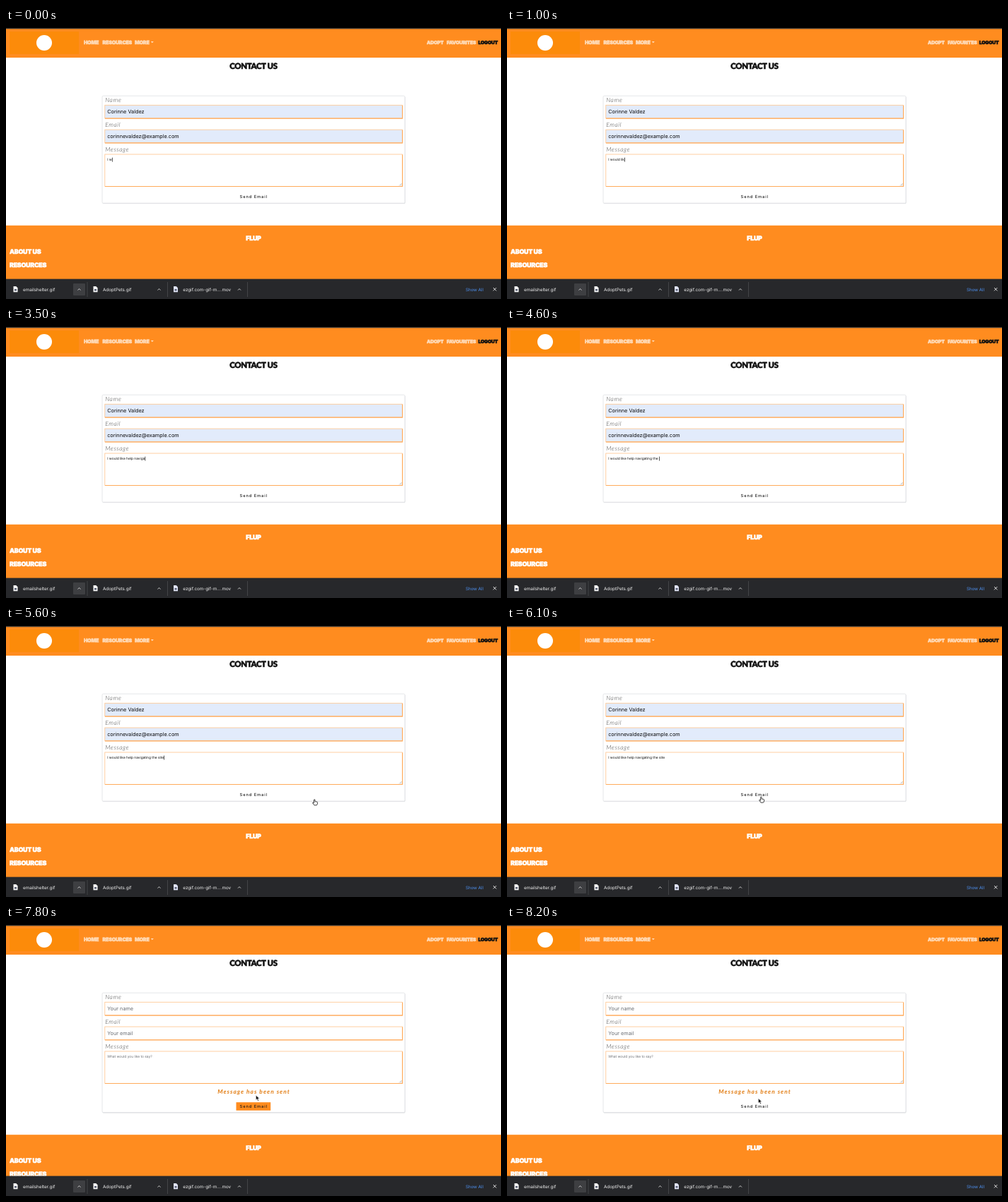
Recreate the animation shown at these times as an HTML page. Size 700 by 384 pixels, loop 8700 ms.

```html
<!DOCTYPE html>
<html lang="en">
<head>
<meta charset="utf-8">
<title>Contact form</title>
<style>
  html, body { margin: 0; width: 100%; height: 100%; overflow: hidden; background: #fff; }
  svg { display: block; width: 100%; height: 100%; }
  text { font-family: Inter, "Liberation Sans", sans-serif; white-space: pre; text-rendering: geometricPrecision; }
  .display { font-family: Lato, sans-serif; font-weight: 900; letter-spacing: -.03em; stroke-width: .5; }
  .light { fill: #ffdcba; stroke: #ffdcba; font-size: 7.1px; }
  .small { font-size: 6.8px; }
  .dark { fill: #111; stroke: #111; }
  .foot { fill: #fff; stroke: #fff; font-size: 8.9px; }
  .label { font: italic 300 8.6px Lato, sans-serif; letter-spacing: .55px; fill: #444; }
  .value { font-size: 7.3px; }
  .note { font-size: 4.85px; }
  .send { font-size: 5.75px; font-weight: 500; letter-spacing: .9px; fill: #1a1a1a; }
  .sent { font: italic 700 8.4px Lato, sans-serif; letter-spacing: 1.05px; fill: #e27d14; }
  .file { font-size: 6.3px; fill: #f1f1f1; }
  .mid { text-anchor: middle; }
  .field { stroke: #ffc48c; stroke-width: .8; }
  .edge { fill: none; stroke: #ffab5c; stroke-width: 1.2; }
</style>
</head>
<body>
<svg viewBox="0 0 700 384" preserveAspectRatio="none">
  <rect width="700" height="42" fill="#ff8c1f"/>
  <rect width="700" height="1.3" fill="#333"/>
  <rect x="5" y="5" width="98" height="32" fill="#fc8b0a"/>
  <circle cx="54" cy="21" r="11" fill="#fff"/>
  <g class="display light">
    <text x="110" y="22.8">HOME</text>
    <text x="136.5" y="22.8">RESOURCES</text>
    <text x="182" y="22.8">MORE</text>
    <path d="M204.8 19h4l-2 2.2z" stroke="none"/>
    <g class="small">
      <text x="595" y="22.8">ADOPT</text>
      <text x="623.3" y="22.8">FAVOURITES</text>
      <text class="dark" x="667.8" y="22.8">LOGOUT</text>
    </g>
  </g>
  <text class="display dark mid" x="350" y="58.2" font-size="11.4">CONTACT US</text>

  <rect id="shade" x="136.5" y="97" width="428" height="152" rx="1.5" fill="#d9dadd"/>
  <rect id="card" x="136" y="96.2" width="428" height="152" rx="1.5" fill="#fff" stroke="#dfe1e4" stroke-width=".8"/>
  <text class="label" x="140.2" y="105">Name</text>
  <text class="label" x="140.2" y="140">Email</text>
  <text class="label" x="140.2" y="174.7">Message</text>
  <g id="fields"></g>
  <path d="M556.3 223.4l3.2-3.2M558.2 223.4l1.3-1.3" stroke="#777" stroke-width=".5"/>
  <text id="name" class="value" x="143.2" y="121.4"></text>
  <text id="email" class="value" x="143.2" y="156.2"></text>
  <text id="note" class="note" x="143.2" y="188.3"></text>
  <rect id="caret" y="183.6" width=".7" height="6" fill="#111"/>
  <text id="sent" class="sent mid" x="350.5" y="239.4">Message has been sent</text>

  <g id="lower">
    <rect id="hover" x="325.5" y="233.8" width="48.7" height="11.6" fill="#ff8c1f"/>
    <text class="send mid" x="350.3" y="241.3">Send Email</text>
    <rect y="279.8" width="700" height="110" fill="#ff8c1f"/>
    <g class="display foot">
      <text class="mid" x="350" y="301.2">FLUP</text>
      <text x="5" y="319.8">ABOUT US</text>
      <text x="5" y="339">RESOURCES</text>
    </g>
  </g>

  <rect y="355.6" width="700" height="29" fill="#27282b"/>
  <rect x="95" y="362" width="17" height="17" rx="1" fill="#3e3f42"/>
  <g id="files"></g>
  <text x="650" y="372.5" font-size="6.1" fill="#4f93f5">Show All</text>
  <path d="M689 368l4.4 4.4m0-4.4l-4.4 4.4" stroke="#eee" stroke-width=".9"/>

  <path id="hand" stroke="#111" stroke-width=".8" fill="#fff" stroke-linejoin="round"
    d="M-1.5-3.8q.8-.9 1.5 0v2.5l2.8.5q.9.3.8 1.2l-.5 2.4-.7 1.1h-3.5l-2.4-3.2q0-.9.9-.6l1.1.8z"/>
  <path id="arrow" stroke="#fff" stroke-width=".5" fill="#111"
    d="M0 0v6.8l1.6-1.5 1.2 2.8 1.2-.5-1.2-2.7h2.2z"/>
</svg>
<script>
const LOOP = 8700, SENT = 7800;
const message = "I would like help navigating the site";
// Moment of each keystroke in tenths of a second, from the fourth letter on
const keys = [1, 2, 4, 5, 6, 7, 9, 10, 12, 17, 20, 22, 23, 24, 26, 28, 30, 32, 33, 34, 35,
  38, 38, 40, 40, 41, 43, 44, 46, 46, 48, 49, 50, 52];

const $ = id => document.getElementById(id);
const clamp = v => Math.max(0, Math.min(1, v));
const ramp = (t, a, b) => clamp((t - a) / (b - a));
const ease = p => p * p * (3 - 2 * p);
const mix = (a, b, p) => a + (b - a) * p;
const show = (id, on) => $(id).setAttribute("visibility", on ? "visible" : "hidden");
const move = (id, x, y) => $(id).setAttribute("transform", `translate(${x} ${y})`);

function write(id, text, color) {
  $(id).textContent = text;
  $(id).setAttribute("fill", color);
}

$("fields").innerHTML = [[109.3, 18.7], [144.1, 18.7], [179, 45.4]].map(([y, h]) =>
  `<rect class="field" x="139.8" y="${y}" width="420.6" height="${h}" fill="#fff"/>
   <path class="edge" d="M140 ${y + h + .1}H560.6V${y + .4}"/>`).join("");
const boxes = [...document.querySelectorAll(".field")].slice(0, 2);

$("files").innerHTML = [
  [10.5, 24, 103.5, 115, "emailshelter.gif", "#f4f4f4"],
  [123.5, 137, 216.5, 228.5, "AdoptPets.gif", "#f4f4f4"],
  [237, 250.3, 330, 341.5, "ezgif.com-gif-m....mov", "#dfe3f5"]
].map(([icon, x, chevron, line, label, color]) =>
  `<path d="M${icon} 366h3.8l2.2 2.2v6h-6z" fill="${color}"/>
   <path d="M${icon + 1.5} 370h3v2.4h-3z" fill="#555b70"/>
   <text class="file" x="${x}" y="372.7">${label}</text>
   <path d="M${chevron - 2} 371.5l2-2 2 2" fill="none" stroke="#ddd" stroke-width=".9"/>
   <path d="M${line} 360v21" stroke="#4b4c50" stroke-width=".8"/>`).join("");

function draw(t) {
  const sent = t >= SENT, shift = sent ? 17.4 : 0;
  const ink = sent ? "#6a6d72" : "#0a0a0a";
  write("name", sent ? "Your name" : "Corinne Valdez", ink);
  write("email", sent ? "Your email" : "corinnevaldez@example.com", ink);
  const typed = 3 + keys.filter(k => k * 100 <= t).length;
  write("note", sent ? "What would you like to say?" : message.slice(0, typed), ink);
  boxes.forEach(b => b.setAttribute("fill", sent ? "#fff" : "#e2ebfb"));

  show("caret", t < 5700);
  $("caret").setAttribute("x", 143.3 + $("note").getComputedTextLength());
  show("sent", sent);
  move("lower", 0, shift);
  for (const id of ["shade", "card"]) $(id).setAttribute("height", 152 + shift);
  $("hover").setAttribute("opacity", sent ? 1 - ramp(t, SENT, 8100) : ramp(t, 6200, 6400));

  const glide = ease(ramp(t, 5600, 6200));
  show("hand", t >= 5400 && !sent);
  move("hand", mix(437, 354, glide), mix(mix(252.5, 250, ramp(t, 5400, 5600)), 246, glide));
  const drift = ramp(t, SENT, 8200);
  show("arrow", sent);
  move("arrow", mix(353.4, 355.4, drift), mix(241.2, 245.7, drift));
}

const start = performance.now();
function frame() {
  const t = (performance.now() - start) % LOOP;
  draw(Math.floor(t / 100) * 100);
  requestAnimationFrame(frame);
}
frame();
</script>
</body>
</html>
```
